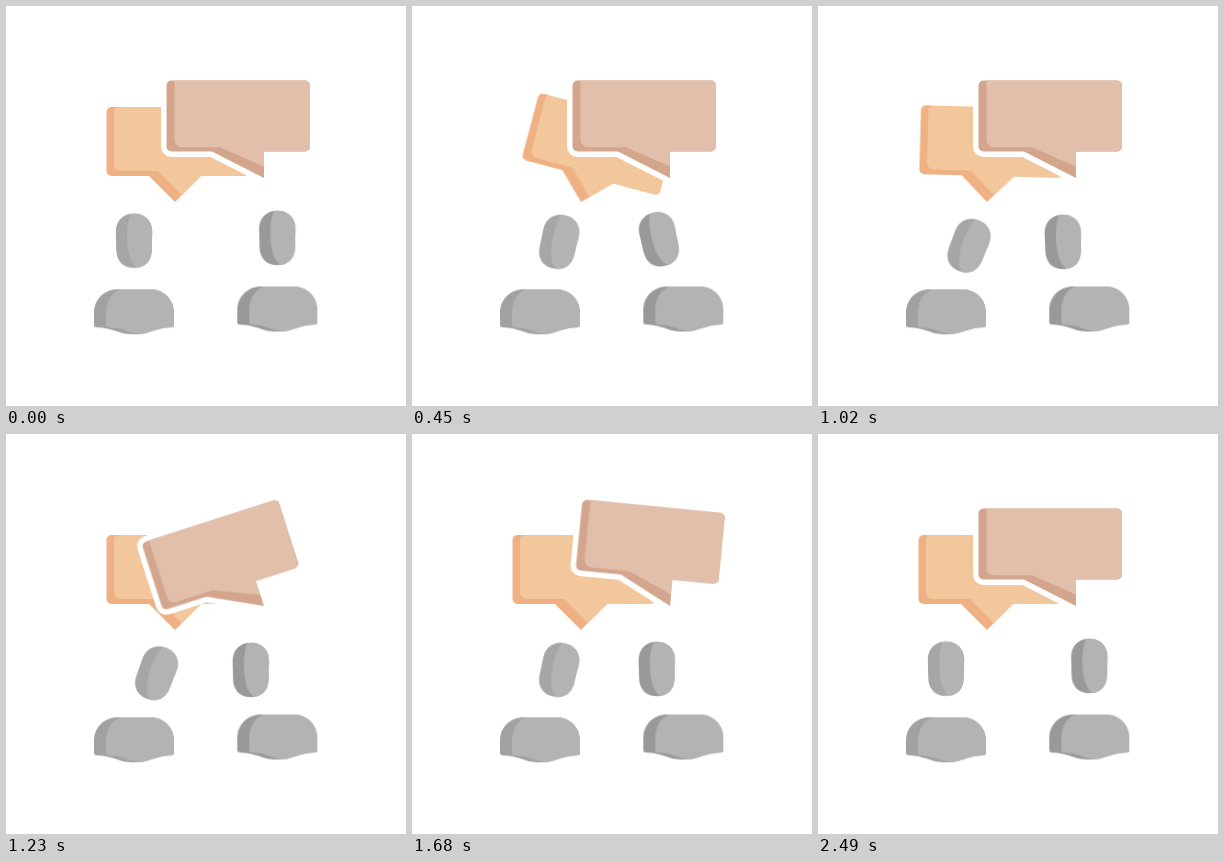
Write an HTML page without scripts that moves like this. It is 400 px wide and 400 px high and loops after 4.55 s.

```html
<!DOCTYPE html>
<html lang="en">
<head>
<meta charset="utf-8">
<title>Conversation</title>
<style>
  html, body { margin: 0; height: 100%; overflow: hidden; background: #fff; }
  svg { display: block; width: 100vw; height: 100vh; }

  .bubble, .head, .body {
    animation: 4550ms cubic-bezier(.37, 0, .63, 1) infinite;
  }
  .bubble { animation-name: swing; }
  .first { transform-origin: 169px 196px; }
  .second { transform-origin: 258px 172px; animation-delay: 1110ms; }
  .left.head { animation-name: head-left; }
  .right.head { animation-name: head-right; }
  .left.body { animation-name: squash-left; }
  .right.body { animation-name: squash-right; }
  .head, .body { transform-origin: 0 0; }

  .left { --shade: #a1a1a1; }
  .right { --shade: #999; }
  .left.head { --shade: #a6a6a6; }
  .shade { fill: var(--shade); }
  .light { fill: #b3b3b3; }

  @keyframes swing {
    0%, 25.9%, 100% { transform: rotate(0deg); }
    3.74% { transform: rotate(-22deg); }
    10.15% { transform: rotate(15deg); }
    15.65% { transform: rotate(-8.5deg); }
    20.88% { transform: rotate(2deg); }
  }
  @keyframes head-left {
    0%, 52.7%, 100% { transform: none; }
    7.25%, 13.2%, 35.2%, 44.2% { transform: translate(19px, 1.2px) rotate(13deg); }
    24.07% { transform: translate(23px, 5.2px) rotate(22deg); }
    48.1% { transform: translate(5.2px, 3.5px) rotate(3deg); animation-timing-function: ease-out; }
  }
  @keyframes head-right {
    0%, 48.8%, 100% { transform: none; }
    7.25% { transform: translate(-24.3px, 1.2px) rotate(-12deg); }
    15.4% { transform: translate(-24.3px, 2px) rotate(-13deg); }
    24.07% { transform: translate(-26.5px, 4.2px) rotate(0deg); }
    35.2%, 40.2% { transform: translate(-26.5px, 3px) rotate(0deg); }
    44.2% { transform: translate(-7.3px, 3.9px) scale(1.03, .97); animation-timing-function: ease-out; }
  }
  @keyframes squash-left {
    0%, 8.8%, 44.2%, 53.5%, 100% { transform: none; }
    3.5%, 48% { transform: scale(1.045, .95); }
  }
  @keyframes squash-right {
    0%, 8.8%, 40.2%, 49%, 100% { transform: none; }
    3.5% { transform: scale(1.065, .95); }
    44.2% { transform: scale(1.035, .96); }
  }
</style>
</head>
<body>
<svg viewBox="0 0 400 400">
  <defs>
    <g id="head">
      <path class="shade" d="M-18.2-9C-18.2-20-11-27.3 0-27.3S18.2-20 18.2-9L17.7 10C17.4 20 11 27.3 0 27.3S-17.4 20-17.7 10Z"/>
      <path class="light" d="M-3.5-27C-6-20-7-13-7-5C-6.8 10-4 22 3 27.1C12 26 17.4 20 17.7 10L18.2-9C18.2-20 11-27.3 0-27.3Z"/>
    </g>
    <g id="body">
      <path class="shade" d="M-40-9V-21C-40-35-30-45-16-45H16C30-45 40-35 40-21V-9Q40-7.2 38-7.1C18-6 16 0 0 0S-18-6-38-7.1Q-40-7.2-40-9Z"/>
      <path class="light" d="M-14-45H16C30-45 40-35 40-21V-9Q40-7.2 38-7.1C19-6 17-.6 4-.2C-7-2-11-6.5-26-7.1Q-28-7.2-28-9V-21C-28-32-23-42-14-45Z"/>
    </g>
  </defs>

  <g class="bubble first">
    <path fill="#efb083" d="M105.500 101H238a5 5 0 0 1 5 5V165a5 5 0 0 1-5 5H195L169 196L143 170H105.500a5 5 0 0 1-5-5V106a5 5 0 0 1 5-5Z"/>
    <path fill="#f3c79c" d="M113 101H238a5 5 0 0 1 5 5V165a5 5 0 0 1-5 5H195L176 189L152 165H115a7 7 0 0 1-7-7V106a5 5 0 0 1 5-5Z"/>
  </g>

  <g class="bubble second">
    <path fill="#d4a58d" stroke="#fff" stroke-width="11" stroke-linejoin="round" paint-order="stroke" d="M165.500 74.500H299a5 5 0 0 1 5 5V140.500a5 5 0 0 1-5 5H258V172L206 145.500H165.500a5 5 0 0 1-5-5V79.500a5 5 0 0 1 5-5Z"/>
    <path fill="#e1bfab" d="M168.500 74.500H299a5 5 0 0 1 5 5V140.500a5 5 0 0 1-5 5H258V160.500L214 141.300H176a7.500 7.500 0 0 1-7.500-7.500Z"/>
  </g>

  <g transform="translate(128 328.300)"><use href="#body" class="left body"/></g>
  <g transform="translate(271.300 325.500)"><use href="#body" class="right body"/></g>
  <g transform="translate(128 234.700)"><use href="#head" class="left head"/></g>
  <g transform="translate(271.300 231.900)"><use href="#head" class="right head"/></g>
</svg>
</body>
</html>
```
